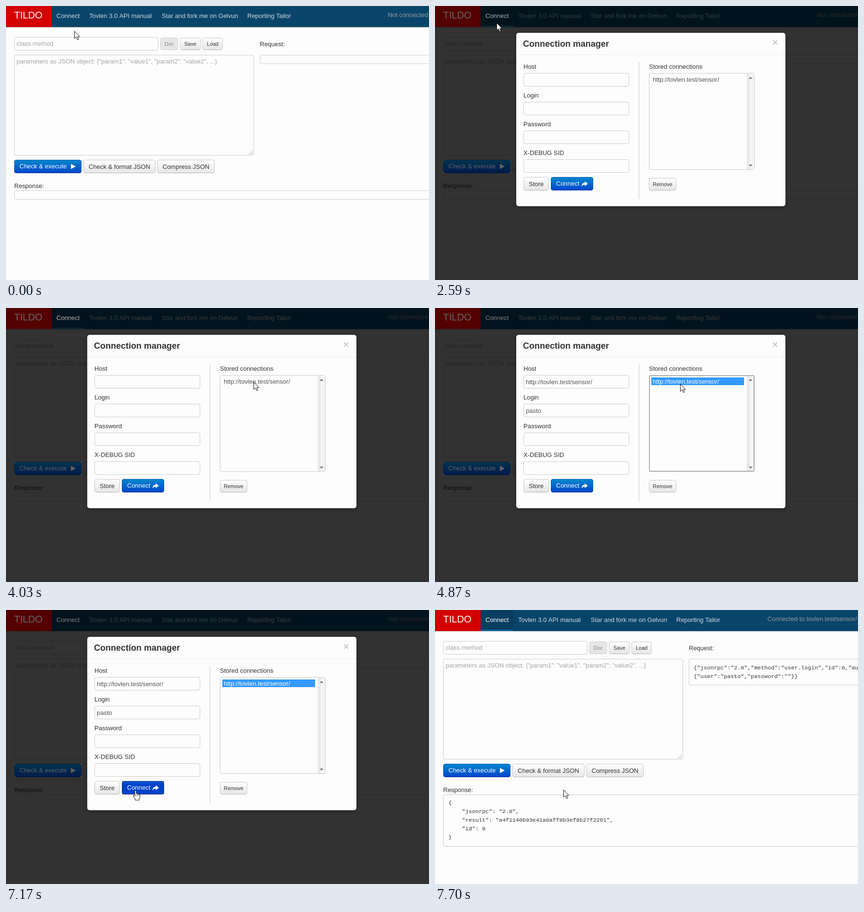
An HTML page with a canvas that plays this animation: 880x572 px, repeating every 8000 ms.

```html
<!DOCTYPE html>
<html lang="en">
<head>
<meta charset="utf-8">
<title>API console</title>
<style>
html, body { margin: 0; width: 880px; height: 572px; overflow: hidden; background: #fdfdfd; }
canvas { display: block; }
</style>
</head>
<body>
<canvas id="stage" width="880" height="572"></canvas>
<script>
const ctx = document.getElementById('stage').getContext('2d');
const LOOP = 8000;
const SANS = '"Liberation Sans", Arial, sans-serif';
const MONO = '"Liberation Mono", "Courier New", monospace';
const HOST = 'tovlen.test/sensor/';
const URL_TEXT = 'http://' + HOST;
const USER = 'pasto';

const AT = {
  hover: 120, open: 2590, select: 4310, fill: 4460,
  buttonHover: 5590, buttonFull: 5740, click: 7170, request: 7290, close: 7700
};

// start time, x, y, shape
const CURSOR = [
  [0, 142, 52, 'arrow'], [120, 126, 35, 'hand'], [2590, 128, 35, 'arrow'],
  [3330, 396, 149, 'arrow'], [3480, 475, 191, 'arrow'], [3730, 491, 172, 'arrow'],
  [3880, 512, 158, 'arrow'], [4030, 515, 154, 'arrow'], [4870, 510, 158, 'arrow'],
  [5010, 459, 243, 'arrow'], [5130, 402, 350, 'arrow'], [5290, 341, 381, 'arrow'],
  [5430, 307, 394, 'arrow'], [5590, 264, 376, 'hand'], [7700, 267, 375, 'arrow']
];

const SHAPES = {
  arrow: [[.5, .5], [.5, 16], [4, 12.7], [6.6, 18.5], [9, 17.4], [6.6, 12], [11.3, 12]],
  hand: [[4, 2], [5.5, .5], [7, 2], [7, 7], [9.3, 7], [10, 8], [12, 8], [12.6, 9], [14, 9],
    [15, 10.5], [15, 15], [13, 18], [13, 21], [5, 21], [5, 19], [1, 13], [.5, 11], [2, 10.5], [4, 12.5]]
};

function text(str, x, y, color = '#333', size = 13, { align = 'left', weight = '', family = SANS } = {}) {
  ctx.font = `${weight} ${size}px ${family}`;
  ctx.textAlign = align;
  ctx.fillStyle = color;
  ctx.fillText(str, x, y);
}

function rect(x, y, w, h, color) {
  ctx.fillStyle = color;
  ctx.fillRect(x, y, w, h);
}

function box(x, y, w, h, fill = '#fdfdfd', stroke = '#ccc', radius = 3.5) {
  ctx.beginPath();
  ctx.roundRect(x + .5, y + .5, w - 1, h - 1, radius);
  ctx.fillStyle = fill;
  ctx.fill();
  ctx.strokeStyle = stroke;
  ctx.lineWidth = 1;
  ctx.stroke();
}

function polygon(points, fill, stroke) {
  ctx.beginPath();
  points.forEach(([x, y]) => ctx.lineTo(x, y));
  ctx.closePath();
  ctx.fillStyle = fill;
  ctx.fill();
  if (stroke) {
    ctx.strokeStyle = stroke;
    ctx.lineWidth = 1;
    ctx.stroke();
  }
}

function gradient(y, h, top, bottom) {
  const g = ctx.createLinearGradient(0, y, 0, y + h);
  g.addColorStop(0, top);
  g.addColorStop(1, bottom);
  return g;
}

function button(label, x, y, w, h, size = 13) {
  box(x, y, w, h, gradient(y, h, '#fff', '#e6e6e6'), '#c8c8c8');
  rect(x + 3, y + h - 1, w - 6, 1, '#b3b3b3');
  text(label, x + w / 2, y + h / 2 + (size > 11 ? 5 : 4), '#333', size, { align: 'center' });
}

// shift slides the gradient upwards, as on hover
function blueButton(label, x, y, w, shift = 0) {
  box(x, y, w, 28, gradient(y - shift, 28 - shift * .4, '#08c', '#04c'), '#0a55b8');
  rect(x + 3, y + 27, w - 6, 1, '#00339a');
  text(label, x + 11, y + 18, '#fff');
}

function monoLines(lines, x, y) {
  lines.forEach((line, i) => text(line, x, y + i * 18, '#333', 11.667, { family: MONO }));
}

function drawNav(t) {
  const done = t >= AT.close;
  const lit = t >= AT.hover;
  rect(0, 0, 880, 44, '#09456a');
  rect(0, 44, 880, 1, '#cfd3d6');
  rect(0, 45, 880, 1, '#f1f1f1');
  rect(0, 0, 95, 44, '#d40000');
  text('TILDO', 17, 26, '#fff', 20);
  if (done) {
    rect(95, 0, 68, 44, '#083e60');
    rect(95, 41, 68, 3, '#10629a');
  } else if (lit && t < AT.select) {
    rect(95, 41, 68, 3, '#1f86c8');
  }
  text('Connect', 105, 25, lit ? '#fff' : '#d0dae1');
  text('Tovlen 3.0 API manual', 173, 25, '#d0dae1');
  text('Star and fork me on Gelvun', 324, 25, '#d0dae1');
  text('Reporting Tailor', 502, 25, '#d0dae1');
  text(done ? 'Connected to ' + HOST : 'Not connected', 878, 23, '#999', 13, { align: 'right' });
}

function drawPage(t) {
  const requested = t >= AT.request;
  const done = t >= AT.close;
  rect(0, 0, 880, 572, done ? '#fcfcfc' : '#fdfdfd');
  drawNav(t);

  box(17, 65, 300, 28);
  text('class.method', 22, 83, '#a5a5a5');
  box(321, 66, 37, 26, '#e6e6e6', '#cfcfcf');
  text('Doc', 339.5, 83, '#858585', 11, { align: 'center' });
  button('Save', 362, 66, 43, 26, 11);
  button('Load', 409, 66, 42, 26, 11);

  box(17, 102, 499, 210);
  text('parameters as JSON object: {"param1": "value1", "param2": "value2", ...}', 22, 120, '#a5a5a5');
  for (let row = 0; row < 3; row++)
    for (let col = 0; col <= row; col++) rect(511 - col * 3, 302 + row * 3, 1.5, 1.5, '#aaa');

  blueButton('Check & execute', 17, 321, 140);
  polygon([[135, 329.5], [145, 335], [135, 340.5]], '#fff');
  button('Check & format JSON', 161, 321, 150, 28);
  button('Compress JSON', 315, 321, 119, 28);

  text('Request:', 528, 84);
  box(528, 102, 400, requested ? 55 : 19);
  if (requested) {
    monoLines(['{"jsonrpc":"2.0","method":"user.login","id":0,"auth":null,"params":',
      `{"user":"${USER}","password":""}}`], 538, 124);
  }

  text('Response:', 17, 380);
  box(17, 385, 900, done ? 109 : 19);
  if (done) {
    monoLines(['{', '    "jsonrpc": "2.0",', '    "result": "a4f1140b93e41a0aff8b3ef8b27f2261",',
      '    "id": 0', '}'], 28, 406);
  }
}

function drawBackdrop(t) {
  ctx.fillStyle = 'rgba(0,0,0,.8)';
  ctx.beginPath();
  ctx.rect(0, 44, 880, 528);
  ctx.rect(17, 321, 140, 28);
  ctx.fill('evenodd');
  rect(17, 321, 140, 28, 'rgba(0,0,0,.62)');
  rect(0, 0, 95, 44, 'rgba(0,0,0,.6)');
  rect(95, 0, 785, 44, 'rgba(0,0,0,.73)');
  text('Connect', 105, 25, t < AT.select ? '#a0a5a8' : '#70777b');
}

function drawStored(t) {
  const selected = t >= AT.select;
  text('Stored connections', 445, 131);
  box(445, 140, 220, 202);
  rect(648, 141, 16, 200, '#f3f3f3');
  rect(649, 141, 6, 200, '#e9e9e9');
  rect(656, 141, 1, 200, '#fff');
  polygon([[652.5, 152], [656.5, 148], [660.5, 152]], '#777');
  polygon([[652.5, 331], [656.5, 335], [660.5, 331]], '#777');
  if (selected) rect(450, 145, 193, 16, '#39f');
  text(URL_TEXT, 453, 158, selected ? '#fff' : '#555');
  if (selected && t < AT.click) {
    ctx.setLineDash([1, 1]);
    ctx.strokeStyle = '#222';
    ctx.strokeRect(446.5, 141.5, 217, 199);
    ctx.setLineDash([]);
  }
  button('Remove', 445, 359, 57, 26, 11);
}

function drawShareIcon() {
  ctx.beginPath();
  ctx.moveTo(311.5, 366);
  ctx.lineTo(318, 371);
  ctx.lineTo(311.5, 376);
  ctx.lineTo(311.5, 373);
  ctx.quadraticCurveTo(307, 372.5, 305, 377);
  ctx.quadraticCurveTo(305, 369, 311.5, 369);
  ctx.fillStyle = '#fff';
  ctx.fill();
}

function drawModal(t) {
  ctx.save();
  ctx.shadowColor = 'rgba(0,0,0,.3)';
  ctx.shadowBlur = 7;
  ctx.shadowOffsetY = 3;
  ctx.beginPath();
  ctx.roundRect(169, 56, 560, 362, 5);
  ctx.fillStyle = '#fdfdfd';
  ctx.fill();
  ctx.restore();

  text('Connection manager', 183, 85, '#333', 18, { weight: 'bold' });
  text('×', 707.5, 83, '#c8c8c8', 20, { weight: 'bold', align: 'center' });
  rect(169, 101, 560, 1, '#eee');
  rect(424, 117, 1, 286, '#ccc');

  ['Host', 'Login', 'Password', 'X-DEBUG SID'].forEach((label, i) => {
    text(label, 184, 131 + i * 60);
    box(184, 140 + i * 60, 220, 28);
  });
  if (t >= AT.fill) {
    text(URL_TEXT, 189, 159, '#555');
    text(USER, 189, 219, '#555');
  }

  button('Store', 184, 357, 53, 28);
  const shift = t >= AT.buttonFull ? 15 : t >= AT.buttonHover ? 8 : 0;
  blueButton('Connect', 241, 357, 88, shift);
  drawShareIcon();
  if (t >= AT.click) {
    ctx.setLineDash([1, 1]);
    ctx.strokeStyle = '#222';
    ctx.strokeRect(242.5, 357.5, 85, 27);
    ctx.setLineDash([]);
  }
  drawStored(t);
}

function drawCursor(t) {
  const [, x, y, shape] = CURSOR.findLast(step => step[0] <= t);
  ctx.save();
  ctx.translate(x, y);
  ctx.lineJoin = 'round';
  polygon(SHAPES[shape], '#fff', '#111');
  if (shape === 'hand') {
    for (const fx of [7, 9.7, 12.3]) rect(fx - .4, 8, .8, 4, '#111');
  }
  ctx.restore();
}

function draw(now) {
  const t = now % LOOP;
  drawPage(t);
  if (t >= AT.open && t < AT.close) {
    drawBackdrop(t);
    drawModal(t);
  }
  drawCursor(t);
}

let start;
function frame(now) {
  start ??= now;
  draw(now - start);
  requestAnimationFrame(frame);
}
draw(0);
requestAnimationFrame(frame);
</script>
</body>
</html>
```
